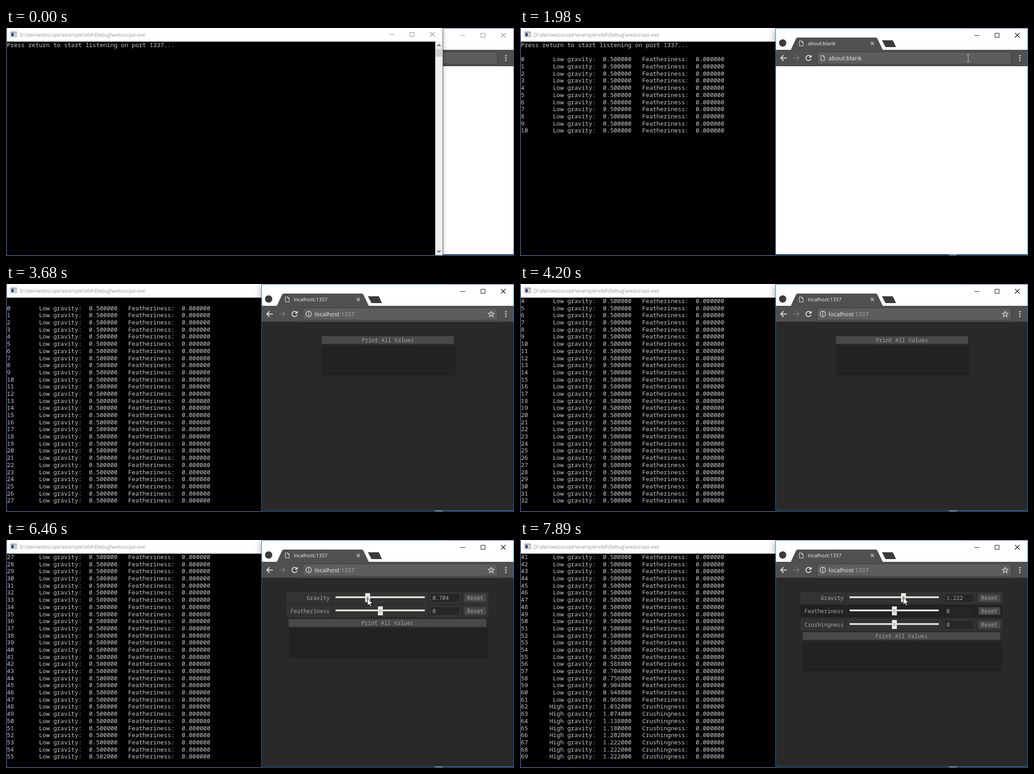
These frames come from a looping animation (1116 by 502 pixels, 7.99 s). An HTML page with a canvas:

```html
<!DOCTYPE html>
<html lang="en">
<head>
<meta charset="utf-8">
<title>Live tuning of console values</title>
<style>
html, body { margin: 0; width: 100%; height: 100%; overflow: hidden; background: #34497a; }
canvas { display: block; }
</style>
</head>
<body>
<canvas id="stage" width="1116" height="502"></canvas>
<script>
const c = document.getElementById('stage').getContext('2d');
const LOOP = 7990, FIRST_LINE = 955, LINE_MS = 100;
const ACTIVATE = 500, RETURN_KEY = 720, TO_BROWSER = 1980, TYPE = 2200, LOADED = 3450;
const ROW = 15.69, COL = 7.84, DRAG = 6160;
const UI = '"Open Sans", "Noto Sans", sans-serif';
const MONO = '"Noto Sans Mono", "DejaVu Sans Mono", monospace';
const DESKTOP = '#34497a';
const URL_TEXT = 'localhost:1337';
const PROMPT = 'Press return to start listening on port 1337...';

// Gravity values, one per printed line from line 54 on
const gravity = [.5, .502, .588, .704, .756, .904, .948, .968, 1.032, 1.074, 1.138, 1.18, 1.202, 1.222];

// Pointer path: time, x, y
const path = [
  [30, 972, 502], [450, 939, 300], [700, 939, 262], [850, 938, 258], [1150, 914, 255],
  [1600, 914, 255], [1950, 985, 66], [2150, 963, 67], [2480, 963, 67], [2750, 871, 65], [3300, 871, 65],
  [4980, 1070, 92], [5220, 1026, 109], [5500, 1000, 124], [5800, 950, 128], [6060, 780, 128], [6160, 775, 128]
];

const clamp = (v, lo, hi) => Math.min(hi, Math.max(lo, v));

function rect(x, y, w, h, color) {
  c.fillStyle = color;
  c.fillRect(x, y, w, h);
}

function box(x, y, w, h, color) {
  c.strokeStyle = color;
  c.lineWidth = 1;
  c.strokeRect(x + .5, y + .5, w - 1, h - 1);
}

function text(s, x, y, size, color, family = UI, align = 'left') {
  c.font = `${size}px ${family}`;
  c.fillStyle = color;
  c.textAlign = align;
  c.fillText(s, x, y);
}

function line(points, color, width = 1, fill) {
  c.beginPath();
  points.forEach(([x, y]) => c.lineTo(x, y));
  if (fill) {
    c.closePath();
    c.fillStyle = fill;
    c.fill();
  }
  if (color) {
    c.strokeStyle = color;
    c.lineWidth = width;
    c.stroke();
  }
}

function ring(x, y, r, color, width, from = 0, to = Math.PI * 2) {
  c.beginPath();
  c.arc(x, y, r, from, to);
  c.strokeStyle = color;
  c.lineWidth = width;
  c.stroke();
}

function dot(x, y, r, color) {
  c.beginPath();
  c.arc(x, y, r, 0, Math.PI * 2);
  c.fillStyle = color;
  c.fill();
}

function cross(x, y, r, color, width) {
  line([[x - r, y - r], [x + r, y + r]], color, width);
  line([[x - r, y + r], [x + r, y - r]], color, width);
}

// Minimise, maximise and close; x is the left edge of the first
function controls(x, y, active) {
  const color = active ? '#000' : '#8c8c8c';
  rect(x, y, 11, 1, color);
  box(x + 45, y - 5, 10, 10, color);
  cross(x + 94.5, y, 5, color, 1.1);
}

function pageIcon(x, y, color) {
  line([[x, y], [x + 5, y], [x + 8, y + 3], [x + 8, y + 11], [x, y + 11], [x, y - .5]], color, 1.2);
  line([[x + 5, y], [x + 5, y + 3], [x + 8, y + 3]], color, 1);
}

function shadow(x, y, w, h, blur, alpha) {
  c.save();
  c.shadowColor = `rgba(0,0,0,${alpha})`;
  c.shadowBlur = blur;
  c.shadowOffsetY = 2;
  rect(x, y, w, h, '#fff');
  c.restore();
}

const lastLine = t => Math.floor((t - FIRST_LINE) / LINE_MS);
const lineValue = i => gravity[clamp(i - 54, 0, gravity.length - 1)];

function sliderValue(t) {
  const u = clamp((t - DRAG) / LINE_MS, 0, gravity.length - 1);
  const i = Math.min(Math.floor(u), gravity.length - 2);
  const v = gravity[i] + (gravity[i + 1] - gravity[i]) * (u - i);
  return Math.round(v * 500) / 500;
}

const thumbX = v => Math.floor(822 + (v - 1) * 93);

function logLine(i) {
  const v = lineValue(i), high = v > 1;
  const label = (high ? 'High gravity:' : 'Low gravity:').padStart(13);
  const extra = high ? 'Crushingness:' : 'Featheriness:';
  return `${String(i).padEnd(8)}${label}  ${v.toFixed(6)}   ${extra}  0.000000`;
}

function drawConsole(t) {
  const active = t >= ACTIVATE && t < TO_BROWSER;
  const n = lastLine(t), scroll = Math.max(0, n - 26);
  const put = (s, row) => text(s, 2, 42 + ROW * row, 13.07, '#cacaca', MONO);

  shadow(2, 0, 957, 500, active ? 22 : 10, active ? .6 : .45);
  rect(0, 500, 960, 2, active ? '#1878c0' : '#3a4f7c');
  rect(1, 0, 1, 501, active ? '#1d6fb5' : '#47608f');
  rect(959, 0, 1, 501, active ? '#1d6fb5' : '#5a6272');
  rect(2, 30, 941, 470, '#000');

  rect(10, 8, 14, 12, '#8b9097');
  rect(11, 10, 12, 9, '#f2f2f2');
  rect(12, 11, 5, 7, '#28427a');
  rect(18, 11, 4, 7, '#c3c8d0');
  text('D:\\dev\\webscope\\example\\x64\\Debug\\webscope.exe', 30, 18.5, 11.13, active ? '#000' : '#969696');
  controls(842, 14, active);

  rect(943, 30, 16, 470, '#f0f0f0');
  rect(944, 46, 14, 17, '#cdcdcd');
  line([[947.5, 40], [951, 36.5], [954.5, 40]], '#505050', 1.8);
  line([[947.5, 490], [951, 493.5], [954.5, 490]], '#505050', 1.8);

  if (!scroll) put(PROMPT, 0);
  for (let i = Math.max(0, scroll - 2); i <= n; i++) put(logLine(i), i + 2 - scroll);

  if (active && t % 1060 < 530) {
    const entered = t >= RETURN_KEY;
    const row = entered ? 3 + Math.max(n, -1) : 0;
    rect(entered ? 2 : 2 + COL * PROMPT.length, Math.round(41.5 + ROW * row), 8, 3, '#fff');
  }
}

function addressBar(t, loaded) {
  rect(652, 52, 428, 28, '#3a3a3a');
  rect(653, 53, 426, 26, '#5d5d5d');
  const s = t < TYPE ? 'about:blank' : URL_TEXT.slice(0, Math.ceil((t - TYPE) / 42));
  const host = t < TYPE ? s : s.slice(0, 9);
  text(host, 678, 70.5, 13, '#f2f2f2');
  const hostEnd = 678 + c.measureText(host).width;
  const port = s.slice(host.length);
  text(port, hostEnd, 70.5, 13, '#b0b0b0');
  const end = hostEnd + c.measureText(port).width;

  if (loaded) {
    ring(665, 66, 6, '#e4e4e4', 1.3);
    rect(664.3, 65, 1.5, 4.5, '#e4e4e4');
    rect(664.3, 62.3, 1.5, 1.6, '#e4e4e4');
    const star = [...Array(11).keys()].map(k => {
      const r = k % 2 ? 2.8 : 6.5, a = k * Math.PI / 5 - Math.PI / 2;
      return [1066 + r * Math.cos(a), 66.5 + r * Math.sin(a)];
    });
    line(star, '#e8e8e8', 1.3);
  } else {
    pageIcon(661, 60.5, '#dedede');
    if (t >= TYPE) rect(Math.round(end) + 1, 56, 1, 18, '#e8e8e8');
  }
}

function sliderRow(k, name, value, x, dim) {
  const y = 114 + Math.floor(k * 29.5);
  const cell = dim ? '#212121' : '#333';
  [[616, 99], [717, 210], [929, 72], [1003, 57]].forEach(([left, w]) => rect(left, y, w, 27, cell));
  const label = (s, tx, align) => text(s, tx, y + 17.5, 11.95, '#a6a6a6', MONO, align);
  label(name, 711, 'right');
  rect(724, y + 10, 196, 4, '#deded6');
  rect(x - 5, y + 3, 11, 20, '#f0f0ec');
  box(x - 5, y + 3, 11, 20, '#c9c9c2');
  for (let j = 0; j < 3; j++) rect(x - 2, y + 10 + j * 3, 5, 1, '#777');
  rect(934, y + 5, 62, 17, '#262626');
  label(String(value), 937, 'left');
  rect(1007, y + 5, 48, 17, '#474747');
  label('Reset', 1031, 'center');
}

function drawPage(t) {
  rect(562, 84, 553, 414, '#292929');
  const n = lastLine(t);
  const rows = n < 36 ? 0 : n < 62 ? 2 : 3;
  if (rows) {
    const v = sliderValue(t);
    sliderRow(0, 'Gravity', v, thumbX(v));
    sliderRow(1, 'Featheriness', 0, 822, rows > 2);
    if (rows > 2) sliderRow(2, 'Crushingness', 0, 822);
  }
  const x = rows ? 621 : 694, w = rows ? 434 : 290, y = Math.round(115 + rows * 29.4);
  rect(x, y, w, 17, '#484848');
  text('Print All Values', x + w / 2, y + 12.5, 11.95, '#a6a6a6', MONO, 'center');
  rect(x, y + 20, w + 4, 66, '#222');
}

function drawBrowser(t) {
  const active = t >= TO_BROWSER, loaded = t >= LOADED;
  if (active) shadow(561, 1, 554, 497, 14, .4);
  rect(561, 1, 554, 497, '#fff');
  controls(998, 16, active);

  dot(577, 33, 8, '#3c3c3c');
  line([[595, 48], [607, 22], [610, 21], [782, 21], [785, 23], [797, 48]], null, 0, '#505050');
  line([[795, 27], [819, 27], [826, 42], [803, 42]], null, 0, '#3b3b3b');
  pageIcon(614, 28.5, '#e0e0e0');
  text(loaded ? URL_TEXT : 'about:blank', 632, 38, 11, '#f4f4f4');
  cross(774, 34, 3.5, '#d4d4d4', 1.5);

  rect(561, 48, 554, 36, '#505050');
  rect(561, 83, 554, 1, '#333');
  line([[586, 66], [573, 66]], '#eee', 1.8);
  line([[579, 60], [573, 66], [579, 72]], '#eee', 1.8);
  line([[600, 66], [613, 66]], '#757575', 1.8);
  line([[607, 60], [613, 66], [607, 72]], '#757575', 1.8);
  ring(634, 66, 5.7, '#eee', 1.8, .3, Math.PI * 1.75);
  line([[640.5, 59], [640.5, 65], [634.5, 65]], null, 0, '#eee');
  addressBar(t, loaded);
  for (let k = 0; k < 3; k++) dot(1098, 61 + k * 5, 1.6, '#e8e8e8');

  if (loaded) drawPage(t);
  if (active) {
    box(561, 0, 555, 499, '#1878c8');
    rect(960, 0, 156, 1, DESKTOP);
  }
}

function pointerAt(t) {
  if (t < path[0][0] || t > 3300 && t < 4980) return null;
  if (t >= DRAG) return [thumbX(sliderValue(t)), 128 - clamp((t - 6460) / 500, 0, 2)];
  const i = path.findIndex(p => p[0] > t) - 1;
  const [t0, x0, y0] = path[i], [t1, x1, y1] = path[i + 1];
  const u = (t - t0) / (t1 - t0), e = u * u * (3 - 2 * u);
  return [x0 + (x1 - x0) * e, y0 + (y1 - y0) * e];
}

function drawPointer(t) {
  const p = pointerAt(t);
  if (!p) return;
  const [x, y] = p.map(Math.round);
  if (t > 1900 && t <= 3300) {
    const color = '#c8c8c8';
    rect(x, y - 7, 1, 15, color);
    [-8, 8].forEach(d => {
      rect(x - 3, y + d, 3, 1, color);
      rect(x + 1, y + d, 3, 1, color);
    });
    return;
  }
  const arrow = [[0, 0], [0, 16.5], [4, 13], [6.5, 18.5], [9, 17.5], [6.5, 12], [11.5, 12], [0, 0]];
  line(arrow.map(([dx, dy]) => [x + dx, y + dy]), '#000', 1, '#fff');
  if (t >= 4980 && t < 5700) ring(x + 13, y, 6, '#1f8de6', 3.8);
}

function draw(t) {
  rect(0, 0, 1116, 502, DESKTOP);
  const layers = t < TO_BROWSER ? [drawBrowser, drawConsole] : [drawConsole, drawBrowser];
  layers.forEach(layer => layer(t));
  drawPointer(t);
}

const start = performance.now();
function tick() {
  draw((performance.now() - start) % LOOP);
  requestAnimationFrame(tick);
}
tick();
</script>
</body>
</html>
```
